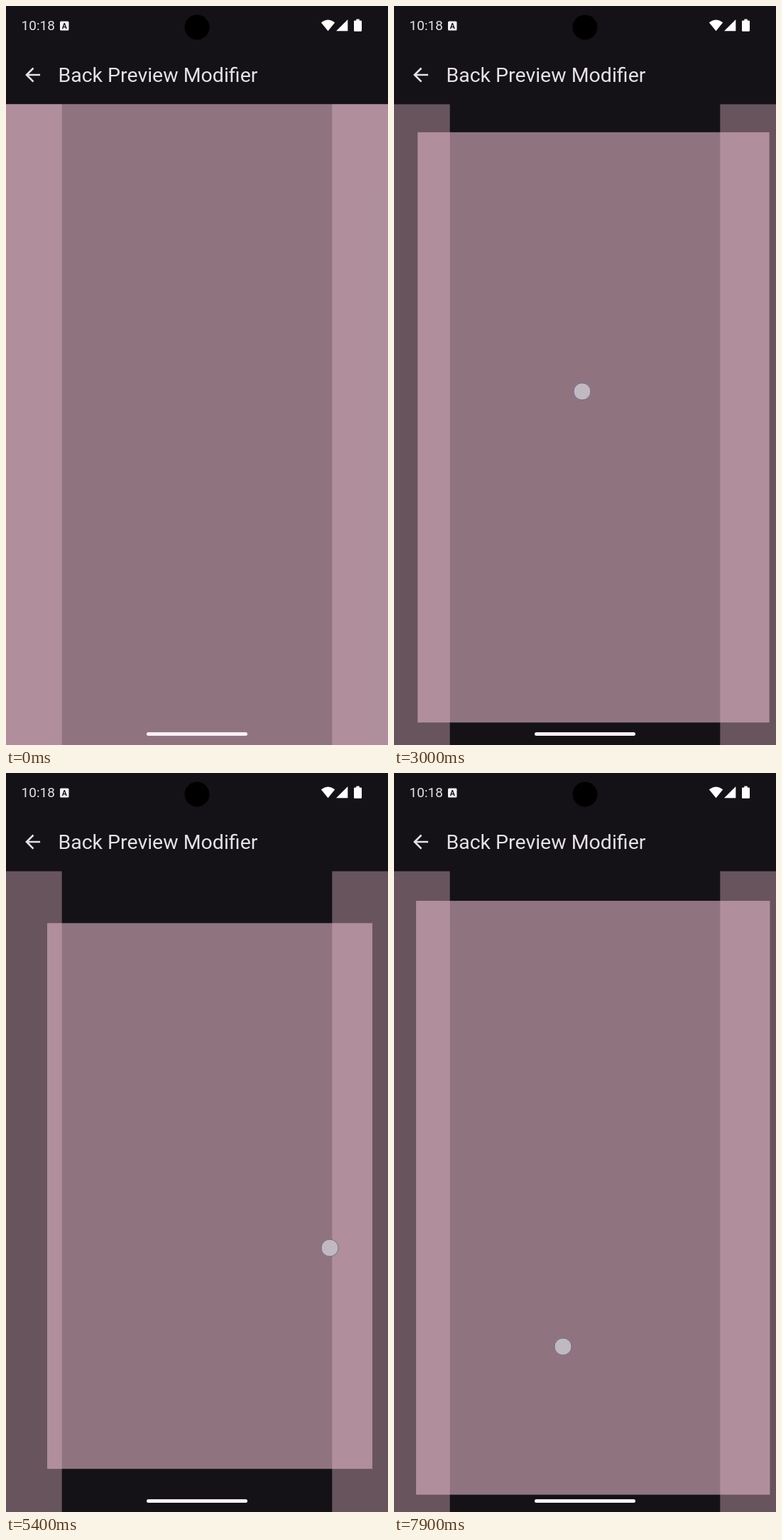
An HTML page that plays this animation: 538 px wide and 1041 px high, repeating every 8 s.

```html
<!DOCTYPE html>
<html lang="en">
<head>
<meta charset="utf-8">
<title>Back Preview Modifier</title>
<style>
  html, body { margin: 0; width: 100%; height: 100%; overflow: hidden; background: #141217; }
  svg { display: block; width: 100vw; height: 100vh; }
  text { font-family: Roboto, sans-serif; fill: #e6e1e6; }
</style>
</head>
<body>
<svg viewBox="0 0 538 1041" preserveAspectRatio="none">
  <rect width="538" height="1041" fill="#141217"/>

  <g fill="#67545d">
    <rect y="138.4" width="78.7" height="903"/>
    <rect x="459.3" y="138.4" width="78.7" height="903"/>
  </g>
  <rect id="pane" fill="#e1b6c6" fill-opacity=".6"/>
  <circle id="touch" r="12" fill="#c1b9c0" stroke="#716d8b"/>

  <!-- status bar -->
  <text x="21.6" y="34" font-size="19">10:18</text>
  <rect x="76" y="21.5" width="12.5" height="13" rx="1.5" fill="#f4f0f4"/>
  <text x="82.2" y="31.8" font-size="10.5" font-weight="700" text-anchor="middle" style="fill:#141217">A</text>
  <circle cx="269" cy="30" r="17.5" fill="#000"/>
  <g fill="#fff">
    <path d="M443.8 23.3Q453.5 15.5 463.2 23.3L453.5 35.3Z"/>
    <path d="M465 35.3L481.3 19V35.3Z"/>
    <path d="M493.3 18.5h4.4v2h2.3q1 0 1 1v13.3q0 1-1 1h-9q-1 0-1-1v-13.3q0-1 1-1h2.3z"/>
  </g>

  <!-- app bar -->
  <path transform="translate(21.9 81.3) scale(1.309)" fill="#e6e1e6"
    d="M20 11H7.83l5.59-5.59L12 4l-8 8 8 8 1.41-1.41L7.83 13H20z"/>
  <text x="73.4" y="106.5" font-size="28.5">Back Preview Modifier</text>

  <rect x="198" y="1023" width="142" height="5" rx="2.5" fill="#f6f0f4"/>
</svg>
<script>
  const LOOP = 8000, STEP = 100, START = 1300, LAG = 60;
  const WIDTH = 538, HEIGHT = 903, MID_X = 269, MID_Y = 589.7;

  // Turning points of the finger: time, x, y
  const path = [
    [1300, 15, 340],
    [2100, 168, 326],
    [2450, 226, 668],
    [3000, 265, 543],
    [3400, 228, 668],
    [4300, 220, 345],
    [4500, 225, 471],
    [5400, 456, 669],
    [6400, 197, 666],
    [6700, 165, 520],
    [7000, 188, 395],
    [7400, 310, 600],
    [7900, 238, 808]
  ];

  const pane = document.getElementById('pane');
  const touch = document.getElementById('touch');

  const set = (el, attrs) => {
    for (const name in attrs) el.setAttribute(name, attrs[name]);
  };

  const slope = (i, k) => (path[i + 1][k] - path[i][k]) / (path[i + 1][0] - path[i][0]);

  // Tangent that never overshoots a turning point
  function tangent(i, k) {
    if (i === 0 || i === path.length - 1) return slope(i ? i - 1 : 0, k);
    const a = slope(i - 1, k), b = slope(i, k);
    return a * b > 0 ? 2 * a * b / (a + b) : 0;
  }

  function sample(time, k) {
    let i = 0;
    while (i < path.length - 2 && time >= path[i + 1][0]) i++;
    const [p, q] = [path[i], path[i + 1]];
    const span = q[0] - p[0];
    const u = Math.min(1, Math.max(0, (time - p[0]) / span));
    const v = 1 - u;
    return v * v * (1 + 2 * u) * p[k] + u * u * (3 - 2 * u) * q[k]
      + span * u * v * (v * tangent(i, k) - u * tangent(i + 1, k));
  }

  function draw(time) {
    const active = time >= START;
    const x = sample(time, 1), y = sample(time, 2);
    // The pane shrinks with the finger's distance from the left edge, slightly late
    const reach = active ? sample(time - LAG, 1) / 1000 : 0;
    const shrink = reach * (0.26 + 0.15 * reach);
    const w = WIDTH * (1 - shrink), h = HEIGHT * (1 - shrink);
    const dx = shrink * (185 - 430 * shrink);
    const dy = active ? 0.018 * (y - 328) : 0;
    set(pane, { x: MID_X + dx - w / 2, y: MID_Y + dy - h / 2, width: w, height: h });
    set(touch, { cx: x, cy: y, visibility: active ? 'visible' : 'hidden' });
  }

  const origin = performance.now();
  function tick(now) {
    const time = Math.max(0, now - origin) % LOOP;
    draw(Math.floor(time / STEP) * STEP);
    requestAnimationFrame(tick);
  }
  draw(0);
  requestAnimationFrame(tick);
</script>
</body>
</html>
```
